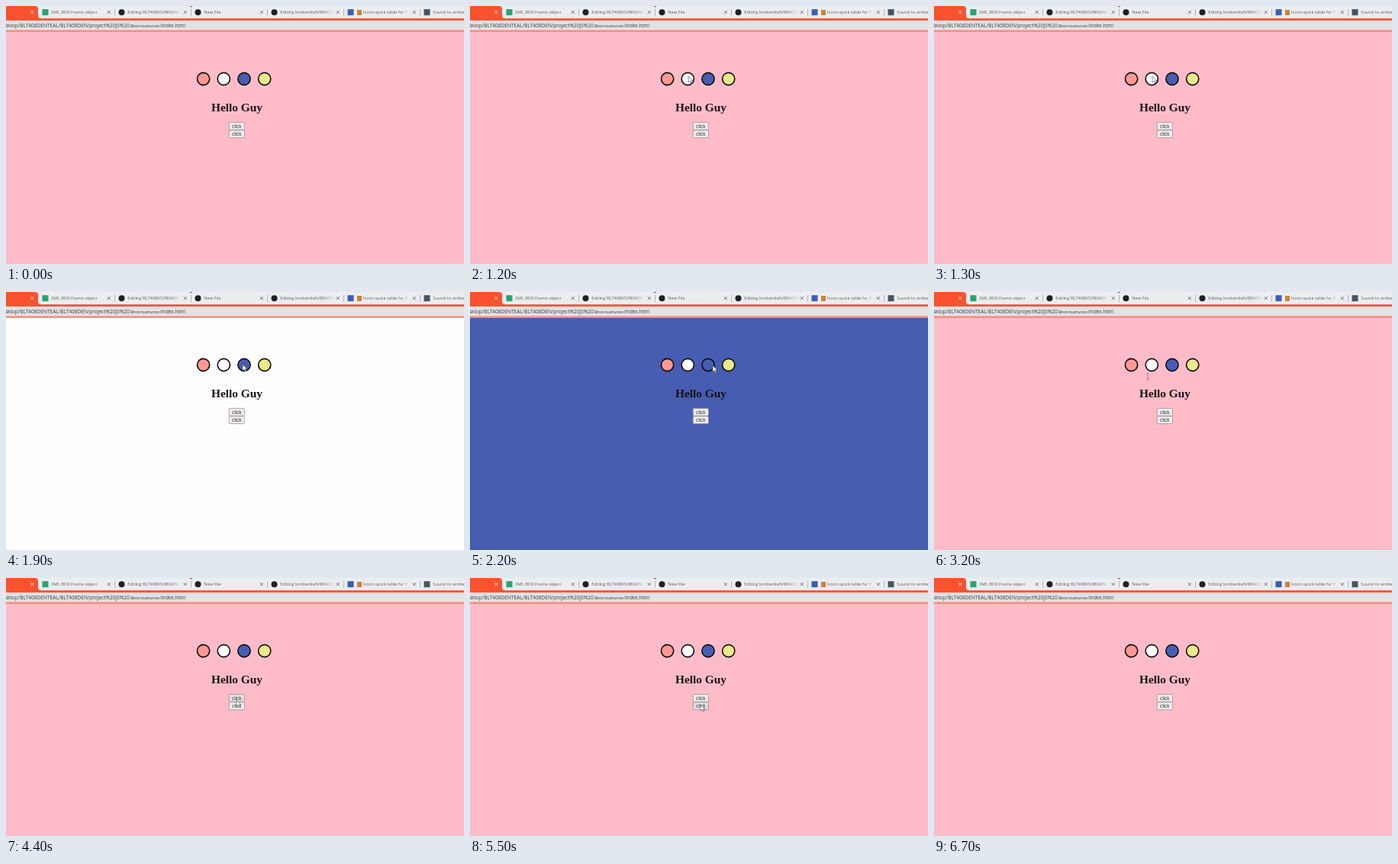
Write an HTML page that moves like this. It is 600 px wide and 338 px high and loops after 7.5 s.

```html
<!DOCTYPE html>
<html lang="en">
<head>
<meta charset="utf-8">
<title>Colour picker page</title>
<style>
  html, body { margin: 0; width: 100%; height: 100%; overflow: hidden; }
  svg { display: block; width: 100%; height: 100%; }
  .ui { font-family: "Open Sans", "Noto Sans Thai", "Noto Sans", sans-serif; white-space: pre; }
  .tab { font-size: 5.7px; fill: #5c5f64; }
  .path { font-size: 6.55px; fill: #3b3b3d; }
  .thai { font-size: 5.9px; }
  .file { font-size: 6.25px; }
  .title { font: bold 15.4px "Liberation Serif", serif; fill: #171114; }
  .label { font: 6.4px "Liberation Sans", sans-serif; fill: #333; }
  .dot { stroke: #0b0b0b; stroke-width: 1.6; }
  .btn { stroke: #88868a; stroke-width: .7; }
</style>
</head>
<body>
<svg viewBox="0 0 600 338" preserveAspectRatio="none">
  <defs>
    <linearGradient id="fade">
      <stop offset="0" stop-color="#ebedef" stop-opacity="0"/>
      <stop offset="1" stop-color="#ebedef"/>
    </linearGradient>
  </defs>
  <rect id="page" width="600" height="338"/>

  <rect width="600" height="17" fill="#ebedef"/>
  <g id="tabs"></g>
  <path d="M0 0H38Q42 0 42 4V12Q42 16.3 46 16.3H600V34H0Z" fill="#f9522f"/>
  <path d="M32.2 6.2l4 4m0-4l-4 4" stroke="#fff" stroke-width=".9"/>
  <path d="M240.5 0h4l-2 1.6z" fill="#e02b2b"/>
  <rect y="19" width="600" height="12.8" fill="#e3e2e4"/>
  <rect y="31.8" width="600" height="2.2" fill="#f78c7c"/>
  <g class="ui path">
    <text x="-1" y="27.7">sktop/BLT408DENTEAL/BLT408DEN/project%20JS%20</text>
    <text class="thai" x="163" y="27.7">ฝึกความสามารถ</text>
    <text class="file" x="235" y="27.7" text-anchor="end">/index.html</text>
  </g>

  <g id="dots"></g>
  <text class="title" x="302.5" y="138" text-anchor="middle">Hello Guy</text>
  <g id="buttons"></g>

  <path id="arrow" d="M0 0V8L1.9 6.3L3.2 9.2L4.6 8.6L3.3 5.8H5.8Z"
        fill="#fff" stroke="#444" stroke-width=".6" stroke-linejoin="round"/>
  <path id="beam" d="M-1.6 -4H-.4L0 -3.6L.4 -4H1.6M0 -3.6V3.6M-1.6 4H-.4L0 3.6L.4 4H1.6"
        fill="none" stroke="#755f68" stroke-width=".7"/>
</svg>
<script>
const LOOP = 7500, STEP = 100;
const PINK = '#ffbcc8', WHITE = '#fefdfe', BLUE = '#475db2', YELLOW = '#e8ea88';
const $ = id => document.getElementById(id);

function add(parent, tag, attrs, text) {
  const el = document.createElementNS('http://www.w3.org/2000/svg', tag);
  for (const key in attrs) el.setAttribute(key, attrs[key]);
  if (text) el.textContent = text;
  parent.append(el);
  return el;
}

// title, icon colour, icon is round
const tabs = [
  ['XML BOX Frame object', '#2aa56f', false],
  ['Editing BLT408K5/READM', '#1d2126', true],
  ['New File', '#1d2126', true],
  ['Editing lomberdaft/READM', '#1d2126', true],
  ['Icons quick table for P', '#3c5fb4', false],
  ['Sound to written', '#4b5260', false]
];
tabs.forEach(([title, color, round], i) => {
  const g = $('tabs'), x = 51.5 + i * 100;
  add(g, 'rect', { x: x - 4, y: 4.2, width: 8, height: 8, rx: round ? 4 : 0, fill: color });
  const gift = i === 4;
  if (gift) add(g, 'rect', { x: 460, y: 5, width: 6, height: 7, fill: '#c98436' });
  add(g, 'text', { class: 'ui tab', x: x + (gift ? 16.5 : 7.8), y: 10.3 }, title);
  if (i === 5) return;
  add(g, 'rect', { x: x + 65, y: 2, width: 13, height: 12, fill: 'url(#fade)' });
  add(g, 'rect', { x: x + 78, y: 2, width: 13, height: 12, fill: '#ebedef' });
  add(g, 'path', { d: `M${x + 81.3} 6.2l4 4m0-4l-4 4`, stroke: '#55595f', 'stroke-width': .8 });
  add(g, 'path', { d: `M${x + 91} 4v9`, stroke: '#9a9ea5', 'stroke-width': .7 });
});

['#ff9893', '#fff', BLUE, YELLOW].forEach((fill, i) =>
  add($('dots'), 'circle', { class: 'dot', cx: 258.6 + i * 26.7, cy: 95.5, r: 8.1, fill }));

const buttons = [152.4, 162.8].map(y => {
  const box = add($('buttons'), 'rect',
    { class: 'btn', x: 292.2, y, width: 20.2, height: 9.8, rx: 1.1 });
  add($('buttons'), 'text',
    { class: 'label', x: 302.3, y: y + 7.1, 'text-anchor': 'middle' }, 'click');
  return { y, box };
});

const colors = [[0, PINK], [1400, WHITE], [2000, BLUE], [2400, YELLOW], [3000, PINK]];

// pointer: time, x, y
const route = [
  [200, 300, 294], [500, 296, 190], [900, 286, 96], [1200, 286, 92], [1600, 286, 93],
  [1900, 310, 95], [2100, 311, 96], [2400, 338, 98], [2600, 338, 98],
  [2900, 260, 96], [3000, 260, 96], [3200, 280, 111], [3400, 288, 128],
  [3800, 302, 157], [4400, 302, 160], [4800, 302, 160], [5000, 302, 166],
  [5500, 302, 166], [5700, 302, 160], [5900, 303, 168], [6200, 306, 216]
];

const smooth = u => u * u * (3 - 2 * u);

function pointer(t) {
  const i = route.findIndex(p => p[0] > t);
  if (i < 1) return null;
  const [t0, x0, y0] = route[i - 1], [t1, x1, y1] = route[i];
  const u = smooth((t - t0) / (t1 - t0));
  return { x: x0 + (x1 - x0) * u, y: y0 + (y1 - y0) * u };
}

function place(el, p, shown) {
  el.style.display = shown ? '' : 'none';
  if (shown) el.setAttribute('transform', `translate(${p.x} ${p.y})`);
}

function draw(t) {
  $('page').setAttribute('fill', colors.filter(c => c[0] <= t).pop()[1]);
  const p = pointer(t);
  const overText = !!p && p.y > 106 && p.y < 144;
  place($('arrow'), p, p && !overText);
  place($('beam'), p, overText);
  for (const { y, box } of buttons) {
    const over = p && p.x > 292 && p.x < 312.5 && p.y >= y && p.y < y + 9.8;
    box.setAttribute('fill', over ? '#e3e0e2' : '#f0eeef');
  }
}

const start = performance.now();
function tick() {
  const t = (performance.now() - start) % LOOP;
  draw(Math.floor(t / STEP) * STEP);
  requestAnimationFrame(tick);
}
tick();
</script>
</body>
</html>
```
